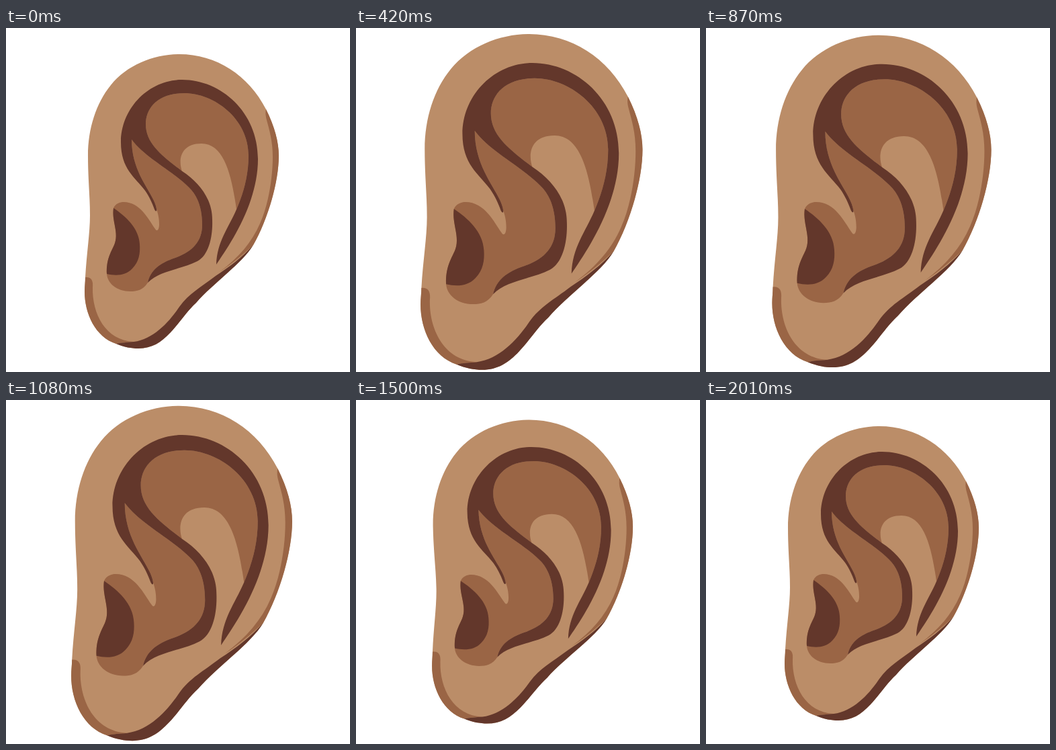
An HTML page that plays this animation: 512x512 px, repeating every 2040 ms.

```html
<!DOCTYPE html>
<html lang="en">
<head>
<meta charset="utf-8">
<title>Ear</title>
<style>
  html, body { margin: 0; width: 100%; height: 100%; overflow: hidden; background: #fff; }
  svg { display: block; width: 100%; height: 100%; }
</style>
</head>
<body>
<svg id="ear" viewBox="0 0 512 512"></svg>
<script>
const LOOP = 2040, STEP = 30;
const CX = 261.5, CY = 258.5, HALF_W = 145, HALF_H = 219;
const SKIN = '#bb8d68', MID = '#9a6545', DARK = '#63372b';

// Edges shared by neighbouring shapes
const rimRight = 'C400,147 406,170 406,190 C406,232 388,288 368,323';
const rimLow = 'C352,350 308,380 283,409 C268,423 260,437 245,453 C231,468 217,477 197,477 C187,477 176,475 164,470';
const rimLobe = 'C133,460 117,425 117,392 C117,385 118,378 118,371';
const foldLow = 'C207,193 247,212 272,237 C286,250 292,270 292,293 C292,318 277,333 252,342 C228,350 215,361 211,379';
const strand = 'C220,245 187,218 187,166';
const bowl = 'C232,190 208,172 208,143 C208,120 225,97 265,97 C310,97 361,135 361,190 C361,222 352,249 343,270';

const shapes = [
  // Silhouette
  [SKIN, `M258,39 C313,39 361,70 387,121 ${rimRight} ${rimLow} ${rimLobe}
    C120,335 125,305 125,279 C125,250 122,225 122,190 C122,150 134,112 156,85 C180,55 220,39 258,39Z`],
  // Shades on the rim
  [MID, `M387,121 ${rimRight} C354,336 338,350 318,363 C346,342 366,319 378,291
    C391,262 397,222 397,192 C397,168 392,152 388,137 C386,130 386,125 387,121Z`],
  [MID, `M118,371 C127,370 130,376 129,386 C128,425 148,465 190,467 C180,468 172,468 164,470 ${rimLobe}Z`],
  [DARK, `M368,323 ${rimLow} C172,468 180,468 190,467 C220,463 243,437 258,415
    C272,395 290,386 312,369 C332,356 352,341 368,323Z`],
  // Hollows
  [MID, `M262,213 ${bowl} C336,220 325,172 291,172 C260,172 256,196 262,213Z`],
  [MID, `M187,166 ${foldLow} C204,390 195,392 185,392 C165,392 151,380 150,366
    C149,345 156,334 161,323 C169,305 157,288 160,268 C163,261 170,259 175,259
    C200,259 212,285 222,299 C225,304 228,300 228,292 C228,282 226,276 224,269 ${strand}Z`],
  [DARK, `M160,268 C157,288 169,305 161,323 C156,334 149,345 150,366
    C163,369 178,369 188,358 C198,348 200,335 199,322 C198,298 178,280 160,268Z`],
  // Folds
  [DARK, `M313,352 C332,324 375,262 375,195 C375,125 320,77 262,77 C212,77 171,120 171,170
    C171,210 192,222 207,242 C214,252 218,262 221,270 C223,274 225,273 224,269 ${strand} ${foldLow}
    C228,361 262,359 285,347 C302,338 308,310 307,285 C307,255 288,230 262,213 ${bowl}
    C331,298 314,318 313,352Z`]
];

// Bends over the ear, with u and v from -1 to 1 across it
const squash = (u, v) => [
  6 - 6 * u * u - 2 * v * v + 5 * u * v * (1 + v),
  2 - 3 * v + 11 * v * v + 6 * u * (1 - v * v)
];
const topLag = (u, v) => [
  12 * u - 6 * u * v + 8 * v * (1 - v * v),
  3 + 11 * v - 10 * v * v
];

const ease = u => (1 - Math.cos(Math.PI * Math.min(1, Math.max(0, u)))) / 2;
const ramp = (t, from, to) => ease((t - from) / (to - from));
const bump = (t, from, peak, to) => ramp(t, from, peak) - ramp(t, peak, to);

// Perk up past the mark, settle, grow slowly, then shrink back
const scaleAt = t => 1
  + .142 * ramp(t, 270, 420) - .033 * ramp(t, 420, 540)
  + .029 * ramp(t, 540, 1080) + .014 * ramp(t, 1080, 1140)
  - .152 * ramp(t, 1140, 1320) + .02 * bump(t, 1320, 1600, 1800);

const svg = document.getElementById('ear');
const parts = shapes.map(([color, d]) => {
  const el = document.createElementNS('http://www.w3.org/2000/svg', 'path');
  el.setAttribute('fill', color);
  svg.append(el);
  return { el, d };
});

function draw(t) {
  const size = scaleAt(t);
  const a = bump(t, 0, 270, 450), b = bump(t, 1140, 1320, 1620);
  const warp = (_, x, y) => {
    const dx = x - CX, dy = y - CY, u = dx / HALF_W, v = dy / HALF_H;
    const [ax, ay] = squash(u, v), [bx, by] = topLag(u, v);
    return (CX + dx * size + a * ax + b * bx).toFixed(2) + ','
      + (CY + dy * size + a * ay + b * by).toFixed(2);
  };
  for (const { el, d } of parts) el.setAttribute('d', d.replace(/(\d+),(\d+)/g, warp));
}

const start = performance.now();
function tick() {
  const t = (performance.now() - start) % LOOP;
  draw(Math.floor(t / STEP) * STEP);
  requestAnimationFrame(tick);
}
tick();
</script>
</body>
</html>
```
